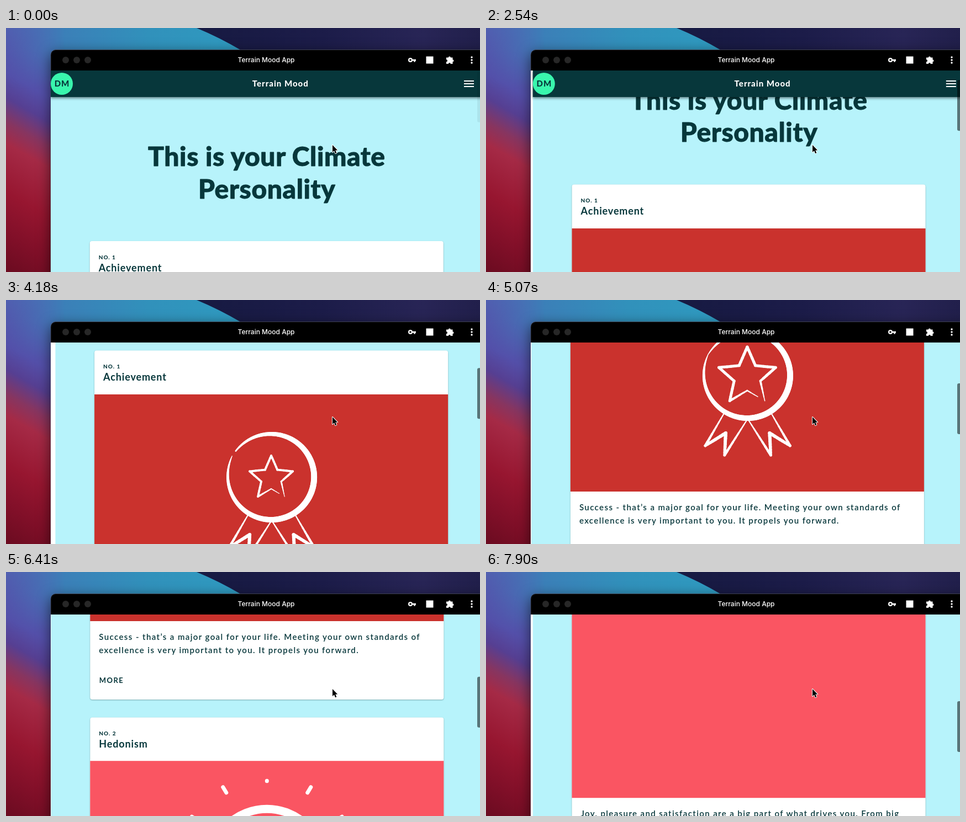
Write an HTML page that moves like this. It is 858 px wide and 442 px high and loops after 8000 ms.

```html
<!DOCTYPE html>
<html lang="en">
<head>
<meta charset="utf-8">
<title>Terrain Mood App</title>
<style>
  html, body { margin: 0; width: 100%; height: 100%; overflow: hidden; background: #07373b; }
  svg { display: block; width: 858px; height: 442px; }
  text { font-family: Lato, sans-serif; fill: #07373b; white-space: pre; }
  .window { filter: drop-shadow(0 7px 12px rgba(0, 0, 0, .6)); }
  .app { font: 500 12px Inter, sans-serif; fill: #fff; text-anchor: middle; }
  .h1 { font-size: 48px; font-weight: 800; letter-spacing: .6px; text-anchor: middle; stroke: #07373b; stroke-width: .9px; stroke-linejoin: round; }
  .bar { font-size: 15px; font-weight: 800; letter-spacing: 1px; text-anchor: middle; }
  .no { font-size: 10px; font-weight: 800; letter-spacing: 1px; }
  .name { font-size: 18px; font-weight: 700; letter-spacing: .85px; }
  .copy { font-size: 15px; font-weight: 600; letter-spacing: 1.4px; }
  .more { font-size: 13px; font-weight: 700; letter-spacing: 1.4px; }
  .card { fill: #fff; filter: drop-shadow(0 1px 1px rgba(0, 0, 0, .3)); }
  .line { fill: none; stroke: #fff; stroke-linecap: round; stroke-linejoin: round; }
  #header { filter: drop-shadow(0 2px 2.5px rgba(0, 0, 0, .5)); }
</style>
</head>
<body>
<svg viewBox="0 0 858 442">
  <defs>
    <linearGradient id="side" gradientUnits="userSpaceOnUse" x1="20" y1="-35" x2="-192" y2="334">
      <stop offset="0" stop-color="#4f68b4"/>
      <stop offset=".26" stop-color="#5450aa"/>
      <stop offset=".35" stop-color="#563f92"/>
      <stop offset=".44" stop-color="#873560"/>
      <stop offset=".52" stop-color="#a52a46"/>
      <stop offset=".7" stop-color="#971630"/>
      <stop offset=".86" stop-color="#800f28"/>
      <stop offset="1" stop-color="#6a0b20"/>
    </linearGradient>
    <linearGradient id="teal">
      <stop offset="0" stop-color="#4a68b2" stop-opacity="0"/>
      <stop offset=".25" stop-color="#3b80b8"/>
      <stop offset=".6" stop-color="#3191bb"/>
      <stop offset="1" stop-color="#2f9bc0"/>
    </linearGradient>
    <linearGradient id="night">
      <stop offset="0" stop-color="#171a42"/>
      <stop offset=".45" stop-color="#1c1c49"/>
      <stop offset=".8" stop-color="#282556"/>
      <stop offset="1" stop-color="#211f4b"/>
    </linearGradient>
    <linearGradient id="fade" x2="0" y2="1">
      <stop offset=".35" stop-color="#fff"/>
      <stop offset="1" stop-color="#000"/>
    </linearGradient>
    <mask id="topFade"><rect width="858" height="110" fill="url(#fade)"/></mask>
    <clipPath id="view"><rect x="81" y="77" width="777" height="365"/></clipPath>
  </defs>

  <rect width="858" height="442" fill="url(#side)"/>
  <rect width="430" height="110" fill="url(#teal)" mask="url(#topFade)"/>
  <path d="M345 0Q386 17 425 40H858V0Z" fill="url(#night)"/>

  <g class="window">
    <rect x="81" y="39.5" width="800" height="430" rx="9" stroke="#4b4d5c" stroke-width=".8"/>
  </g>
  <g fill="#272727">
    <circle cx="108" cy="58" r="6"/><circle cx="128" cy="58" r="6"/><circle cx="148" cy="58" r="6"/>
  </g>
  <text class="app" x="471" y="62">Terrain Mood App</text>
  <g fill="#fff">
    <circle cx="732" cy="58" r="2.9" fill="none" stroke="#fff" stroke-width="2.2"/>
    <path d="M735 56.8h7v2.6h-1.2v2.2h-2.6v-2.2H735z"/>
    <rect x="760.5" y="51.5" width="13" height="13"/>
    <path d="M797 53.5h3.8a2 2 0 1 1 4 0h3.7v3.7a2 2 0 1 1 0 4v3.8h-3.7a2 2 0 0 0-4 0H797v-3.8a2 2 0 0 0 0-4z"/>
    <circle cx="843" cy="53" r="1.7"/><circle cx="843" cy="58" r="1.7"/><circle cx="843" cy="63" r="1.7"/>
  </g>

  <g clip-path="url(#view)">
    <rect x="81" y="77" width="777" height="365" fill="#fff"/>
    <g id="shift">
      <rect x="81" y="77" width="800" height="365" fill="#b7f3fb"/>
      <g id="page">
        <text class="h1" x="471.9" y="250">This is your Climate</text>
        <text class="h1" x="472.2" y="308.7">Personality</text>

        <g transform="translate(151.7 386)">
          <rect class="card" width="640" height="581.5" rx="4"/>
          <text class="no" x="16" y="32.5">NO. 1</text>
          <text class="name" x="16" y="54.5">Achievement</text>
          <g transform="translate(0 79.5)">
            <rect width="640" height="360" fill="#ca322d"/>
            <g id="ring" class="line"></g>
            <g id="star" class="line"></g>
            <g id="ribbonL" class="line"></g>
            <g id="ribbonR" class="line" transform="translate(641.5 0) scale(-1 1)"></g>
          </g>
          <text class="copy" x="16" y="473.7">Success - that’s a major goal for your life. Meeting your own standards of</text>
          <text class="copy" x="16" y="497.7">excellence is very important to you. It propels you forward.</text>
          <text class="more" x="16.5" y="551.5">MORE</text>
        </g>

        <g transform="translate(151.7 1000)">
          <rect class="card" width="640" height="581.5" rx="4"/>
          <text class="no" x="16" y="32.5">NO. 2</text>
          <text class="name" x="16" y="54.5">Hedonism</text>
          <g transform="translate(0 78.7)">
            <rect width="640" height="360" fill="#fa5562"/>
            <g id="sun" class="line" stroke-width="7">
              <circle cx="320" cy="190" r="103" stroke-width="15"/>
              <path d="M320 36v.5M240.5 47.5l6 10M399.5 47.5l-6 10M184 101l10 6M456 101l-10 6"/>
            </g>
          </g>
          <text class="copy" x="16" y="472.5">Joy, pleasure and satisfaction are a big part of what drives you. From big</text>
        </g>
      </g>

      <g id="header">
        <rect x="81" y="77" width="800" height="48" fill="#07373b"/>
        <circle cx="101" cy="101" r="20" fill="#39f5ad"/>
        <text class="bar" x="101.5" y="105.5">DM</text>
        <text class="bar" x="496.8" y="105.5" style="fill:#fff">Terrain Mood</text>
        <path d="M829 96h18M829 101h18M829 106h18" stroke="#fff" stroke-width="2"/>
      </g>
    </g>
    <rect id="thumb" x="853" width="8" height="92" rx="3"/>
  </g>

  <path d="M591 212v13l3-2.8 2.1 5 2.2-1-2-4.8h3.9z" stroke="#fff" stroke-width="1.8" paint-order="stroke" stroke-linejoin="round"/>
</svg>

<script>
const LOOP = 8000, TICK = 149;
const $ = id => document.getElementById(id);

// Tables of [tick, value], linear in between.
const scrollKeys = [[11, 0], [12, 13], [21, 174], [28, 294.5], [34, 478.5], [43, 736.5], [47, 858], [48, 858], [53, 1029.5]];
const shiftKeys = [[11, 0], [12, .5], [18, 4.5], [21, 6], [28, 8.4], [34, 1.2], [36, .4], [43, .6], [48, .3], [53, 3.8]];
const headerKeys = [[17, 0], [18, -32], [19, -60]];
const drawKeys = [[16.5, 0], [21, .38], [28, .976], [29, 1]];
const starKeys = [[16, .35], [21, .5], [28, .76], [34, 1]];

function at(keys, k) {
  if (k <= keys[0][0]) return keys[0][1];
  for (let i = 1; i < keys.length; i++) {
    const [k0, v0] = keys[i - 1], [k1, v1] = keys[i];
    if (k <= k1) return v0 + (v1 - v0) * (k - k0) / (k1 - k0);
  }
  return keys[keys.length - 1][1];
}

// A line of varying width made of n short strokes; returns a function that shows part of it.
function brush(id, n, point, width) {
  const parts = [];
  for (let i = 0; i < n; i++) {
    const el = document.createElementNS('http://www.w3.org/2000/svg', 'path');
    el.setAttribute('d', `M${point(i / n)}L${point((i + 1) / n)}`);
    el.setAttribute('stroke-width', width((i + .5) / n).toFixed(2));
    $(id).append(el);
    parts.push(el);
  }
  return p => parts.forEach((el, i) => { el.style.display = i < p * n ? '' : 'none'; });
}

const polar = (x, y, r, deg) => [x + r * Math.cos(deg * Math.PI / 180), y + r * Math.sin(deg * Math.PI / 180)];

function along(points, u) {
  const i = Math.min(Math.floor(u), points.length - 2), f = u - i;
  return points[i].map((v, j) => v + (points[i + 1][j] - v) * f);
}

const ringWidth = t => 1 + 10 * Math.pow(Math.sin(Math.PI * t), .7);
const drawRing = brush('ring', 180, t => polar(321, 150, 82 - ringWidth(t) / 2, 208 - 360 * t), ringWidth);

const starPoints = Array.from({ length: 11 }, (_, i) => polar(0, 0, i % 2 ? 25 : 54, 54 - 36 * i));
const drawStar = brush('star', 48, t => along(starPoints, t * 9.6),
  t => Math.min(5, 1.3 + 26 * t, 1.3 + 20 * (1 - t)));

const ribbon = [[277, 220], [244, 277], [281, 254], [279, 294], [319, 231]];
const ribbonWidth = t => 2 + 4 * Math.sin(Math.PI * t);
const drawRibbons = ['ribbonL', 'ribbonR'].map(id => brush(id, 32, t => along(ribbon, t * 4), ribbonWidth));

function render(t) {
  const k = Math.max(0, Math.floor((t - 1.5) / TICK));
  const y = at(scrollKeys, k), p = at(drawKeys, k);
  $('shift').setAttribute('transform', `translate(${at(shiftKeys, k)} 0)`);
  $('page').setAttribute('transform', `translate(0 ${-y})`);
  $('header').setAttribute('transform', `translate(0 ${at(headerKeys, k)})`);
  $('thumb').setAttribute('y', 78.8 + y * .1508);
  $('thumb').setAttribute('opacity', k >= 12 ? .52 : t < 150 ? .06 : 0);
  $('star').setAttribute('transform', `translate(320 152) scale(${at(starKeys, k)})`);
  drawRing(p);
  drawStar(Math.min(1, p * 1.03));
  drawRibbons.forEach(draw => draw(p));
  $('sun').style.display = k < 49 ? '' : 'none';
}

const start = performance.now();
function loop() {
  render((performance.now() - start) % LOOP);
  requestAnimationFrame(loop);
}
loop();
</script>
</body>
</html>
```
